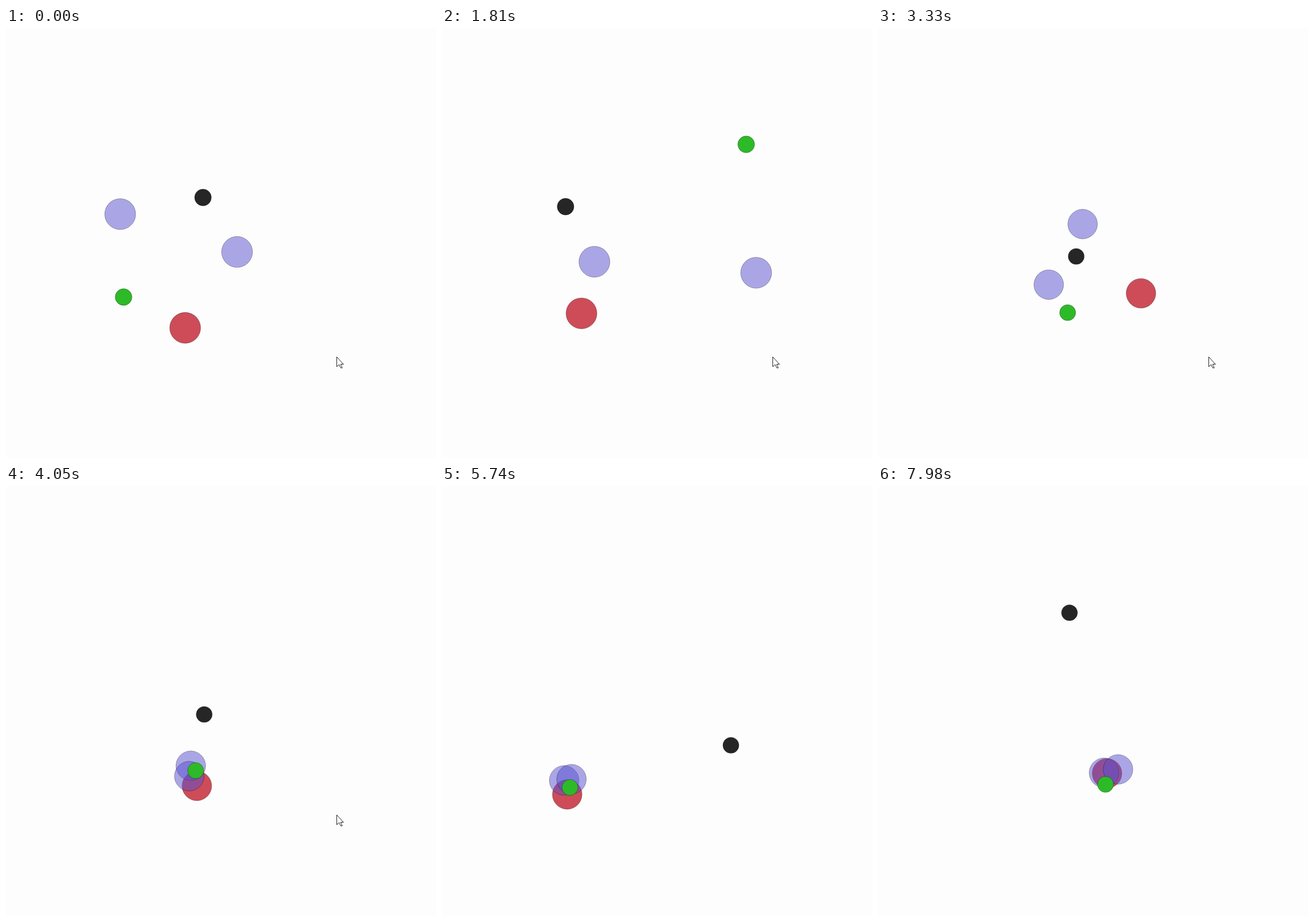
These frames come from a looping animation (704 by 704 pixels, 8000 ms). An HTML page with a canvas:

```html
<!DOCTYPE html>
<html lang="en">
<head>
<meta charset="utf-8">
<title>Agents seeking a landmark</title>
<style>
  html, body { margin: 0; width: 100%; height: 100%; overflow: hidden; background: #fdfdfd; }
  canvas { display: block; }
</style>
</head>
<body>
<canvas id="stage" width="704" height="704"></canvas>
<script>
const ctx = document.getElementById('stage').getContext('2d');
const LOOP = 8000;
const EPISODE = 1604, LEAD = 10;   // episode length, and time already spent at the start (ms)
const RAMP = 100;                  // time constant of the acceleration (ms)
const CRUISE = .363, SLOW = .18;   // speeds (px/ms)

const point = (x, y) => ({ x, y });
const route = (x, y, endX, endY) => ({ from: point(x, y), to: point(endX, endY) });

const episodes = [
  { zoom: 1, speed: CRUISE, black: point(322.5, 277.5), green: point(192.5, 440.5),
    red: route(293.5, 491, 200, 455),
    blues: [route(187, 304.5, 173, 438), route(378.5, 366.5, 192, 426)] },
  { zoom: 1, speed: CRUISE, black: point(202.3, 292.5), green: point(498, 190.5),
    red: route(202.5, 506, 435, 157),
    blues: [route(215, 414, 459, 193), route(525.5, 446, 466, 205)] },
  { zoom: .957, speed: CRUISE, black: point(324.5, 374), green: point(310.5, 466),
    red: route(450, 425, 312.5, 491),
    blues: [route(340, 300, 302.5, 458), route(272, 400, 300, 475)] },
  { zoom: .957, speed: CRUISE, black: point(473, 424.5), green: point(209.5, 493.5),
    red: route(317, 466.5, 205, 505),
    blues: [route(269, 447, 200, 482), route(374, 457, 212, 480)] },
  { zoom: .957, speed: SLOW, black: point(313.5, 207.5), green: point(372.5, 488.5),
    red: route(223.5, 504, 375, 470.5),
    blues: [route(334.7, 243.7, 370, 469.5), route(419.5, 476, 393, 464)] }
];

// Straight travel from rest, easing up to cruising speed, until the end is reached.
function locate({ from, to }, speed, t) {
  const travelled = speed * (t - RAMP * (1 - Math.exp(-t / RAMP)));
  const u = Math.min(1, travelled / Math.hypot(to.x - from.x, to.y - from.y));
  return point(from.x + (to.x - from.x) * u, from.y + (to.y - from.y) * u);
}

function disc({ x, y }, radius, fill) {
  ctx.beginPath();
  ctx.arc(x, y, radius, 0, 2 * Math.PI);
  ctx.fillStyle = fill;
  ctx.fill();
  ctx.strokeStyle = 'rgba(0, 0, 0, .3)';
  ctx.lineWidth = 1;
  ctx.stroke();
}

const arrow = new Path2D('M0 0V16L4 12.5L6.5 18H9L6.5 12H11Z');

function drawCursor(t) {
  const u = Math.max(0, (t - 4300) / 350);
  if (u > 1) return;
  ctx.save();
  ctx.translate(541.5 + 170 * u * u, 538.5);
  ctx.fillStyle = '#fdfdfd';
  ctx.strokeStyle = '#303030';
  ctx.lineWidth = 1;
  ctx.fill(arrow);
  ctx.stroke(arrow);
  ctx.restore();
}

function draw(t) {
  const clock = t + LEAD;
  const scene = episodes[Math.floor(clock / EPISODE)];
  const place = path => locate(path, scene.speed, clock % EPISODE);
  const agent = 25.3 * scene.zoom, landmark = 13.7 * scene.zoom;

  ctx.fillStyle = '#fdfdfd';
  ctx.fillRect(0, 0, 704, 704);
  disc(place(scene.red), agent, '#cd4c58');
  for (const path of scene.blues) disc(place(path), agent, 'rgba(88, 80, 208, .5)');
  disc(scene.black, landmark, '#262626');
  disc(scene.green, landmark, '#2dba28');
  drawCursor(t);
}

const origin = performance.now();
function frame() {
  draw((performance.now() - origin) % LOOP);
  requestAnimationFrame(frame);
}
frame();
</script>
</body>
</html>
```
